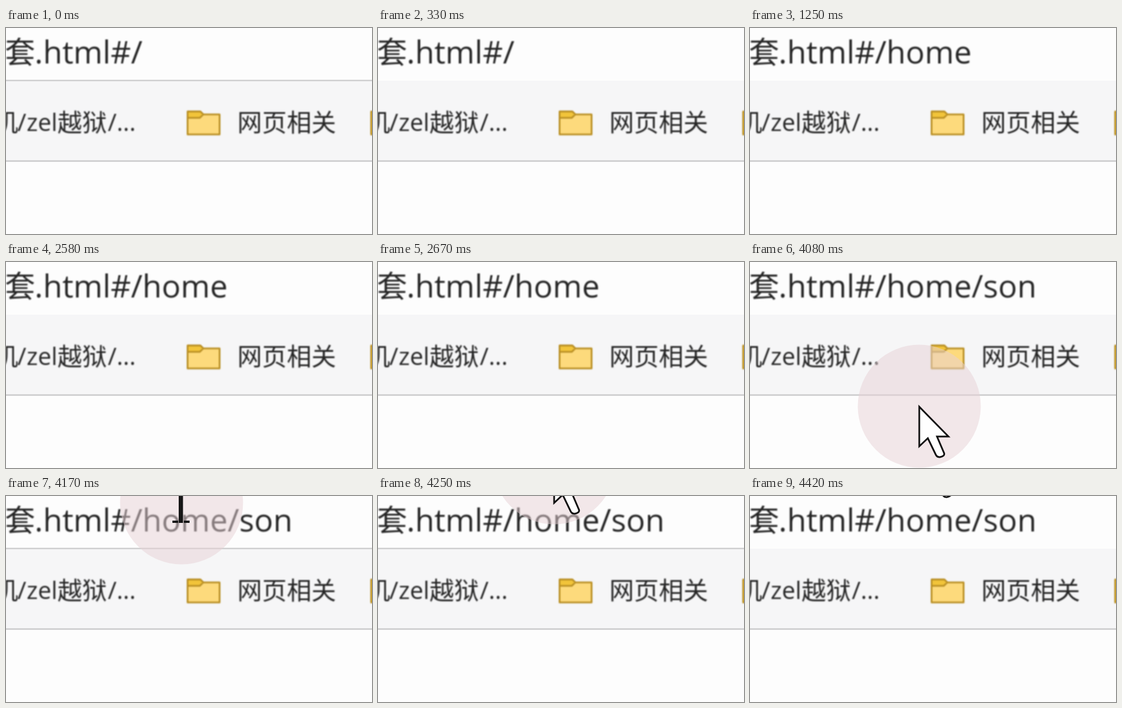
These frames come from a looping animation (640x360 px, 4510 ms). An HTML page:

```html
<!DOCTYPE html>
<html lang="zh">
<head>
<meta charset="utf-8">
<title>Address bar</title>
<style>
  html, body { margin: 0; width: 100%; height: 100%; overflow: hidden; background: #fdfdfd; }
  svg { display: block; width: 640px; height: 360px; }
  text { font-family: "Open Sans", "Noto Sans", sans-serif; fill: #262626; white-space: pre; }
  .cjk { font-family: "Noto Sans CJK SC", "Noto Sans CJK", sans-serif; }
  .url { font-size: 55px; }
  .url.cjk { font-size: 53px; }
  .mark { font-size: 42px; }
  .mark.cjk { font-size: 43.2px; }
  .soft { filter: blur(.8px); }
</style>
</head>
<body>
<svg viewBox="0 0 640 360">
  <rect width="640" height="360" fill="#fdfdfd"/>
  <rect y="92" width="640" height="140" fill="#f6f6f7"/>
  <rect id="topLine" y="90.5" width="640" height="2.5" fill="#cfcfd0"/>
  <rect y="231" width="640" height="3" fill="#d2d2d3"/>

  <g class="soft">
    <text class="url cjk" x="-2" y="62">套</text>
    <text class="url" x="50" y="62" id="url"></text>

    <text class="mark cjk" x="-22" y="180.5">机</text>
    <text class="mark" x="20" y="180">/</text>
    <text class="mark" x="36" y="180">zel</text>
    <text class="mark cjk" x="90" y="180.5">越狱</text>
    <text class="mark" x="178" y="180">/...</text>
    <text class="mark cjk" x="404.5" y="180.5">网页相关</text>

    <g stroke="#b98f24" stroke-width="3" stroke-linejoin="round">
      <path d="M317.5 146H340L345 151H373.5V186H317.5Z" fill="#fdda7c"/>
      <path d="M317.5 146H340L345 151L339 157H317.5Z" fill="#f2c43a"/>
      <path d="M638.5 146V186H650V146Z" fill="#f2c43a"/>
    </g>
  </g>

  <!-- Both pointers have their hot spot at 0,0. -->
  <g id="mouse">
    <circle id="halo" r="107.5" fill="rgb(232,210,213)" fill-opacity=".5"/>
    <path id="arrow" d="M0 1V70L15 56L29 85Q31 89 36 89Q46 87 43 81L31 53H51Z"
      fill="#fff" stroke="#111" stroke-width="3"/>
    <g id="beam" fill="#161616">
      <rect x="-5" y="-36" width="7.5" height="71"/>
      <rect x="-16" y="31" width="10" height="4"/>
      <rect x="4" y="31" width="10" height="4"/>
    </g>
  </g>
</svg>

<script>
const LOOP = 4510;
const $ = id => document.getElementById(id);

// Each step overrides part of the state and holds until the next.
const steps = [
  { at: 0, path: "#/", line: true, mouse: null, pointer: "", halo: true },
  { at: 330, line: false },
  { at: 1250, path: "#/home" },
  { at: 2750, path: "#/home/son" },
  { at: 4080, mouse: [296, 252], pointer: "arrow" },
  { at: 4170, mouse: [307, 12], pointer: "beam", line: true },
  { at: 4250, mouse: [308, -58], pointer: "arrow" },
  { at: 4330, mouse: [308, -87] },
  { at: 4420, halo: false, line: false }
];

const show = (id, on) => $(id).setAttribute("display", on ? "inline" : "none");

function draw(time) {
  const s = Object.assign({}, ...steps.filter(step => step.at <= time));
  $("url").textContent = ".html" + s.path;
  show("topLine", s.line);
  show("mouse", s.mouse);
  show("halo", s.halo);
  show("arrow", s.pointer === "arrow");
  show("beam", s.pointer === "beam");
  if (s.mouse) $("mouse").setAttribute("transform", `translate(${s.mouse})`);
}

const start = performance.now();
function tick() {
  draw((performance.now() - start) % LOOP);
  requestAnimationFrame(tick);
}
tick();
</script>
</body>
</html>
```
